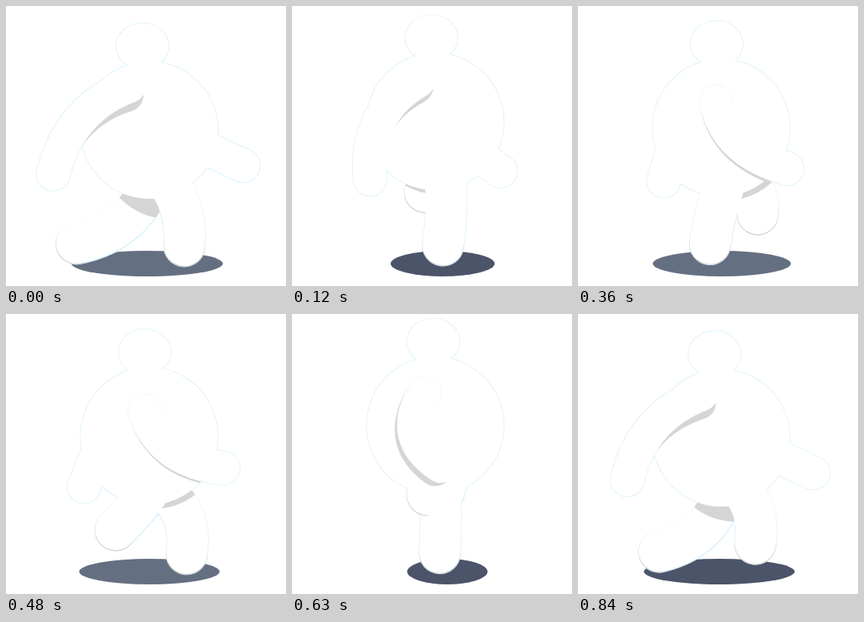
These frames come from a looping animation (350x350 px, 0.87 s). An HTML page with a canvas:

```html
<!DOCTYPE html>
<html lang="en">
<head>
<meta charset="utf-8">
<title>Walk cycle</title>
<style>
  html, body { margin: 0; width: 100%; height: 100%; overflow: hidden; background: #fff; }
  canvas { display: block; width: 350px; height: 350px; }
</style>
</head>
<body>
<canvas id="stage"></canvas>
<script>
const LOOP = 870, STEP = 30, SIZE = 350, TAU = Math.PI * 2;
const WHITE = '#fff', EDGE = '#d3f0fb', RIM = '#d2d2d2', SHADE = '#d5d5d5';
const BODY_X = 179, BODY_R = 86, ARM = 42, LEG = 52;

const cv = document.getElementById('stage');
const ctx = cv.getContext('2d');
const dpr = window.devicePixelRatio || 1;
cv.width = cv.height = Math.round(SIZE * dpr);

const mix = (a, b, k) => a + (b - a) * k;
const wrap = t => (t % LOOP + LOOP) % LOOP;

// Each foot slides back on the ground, then swings forward in an arc.
const nearStep = {
  strike: 0, stance: 455, front: 223, back: 136,
  slide: s => s + 0.13 * Math.sin(TAU * s),
  swing: s => s * s * (3 - 2 * s)
};
const farStep = {
  strike: 470, stance: 400, front: 227, back: 88,
  slide: s => s ** 1.3,
  swing: s => 1 - (1 - s) ** 2.8
};

function foot(step, t) {
  const since = wrap(t - step.strike);
  if (since < step.stance) {
    const s = since / step.stance;
    return [mix(step.front, step.back, step.slide(s)), 300 - 3 * s];
  }
  const s = (since - step.stance) / (LOOP - step.stance);
  const lift = 72 * Math.sin(Math.PI * s ** 0.75);
  return [mix(step.back, step.front, step.swing(s)), 297 + 3 * s - lift];
}

// Curve from hip to foot, with the knee pushed forward by the given amount.
function leg(hipX, hipY, [x, y], knee) {
  const dx = x - hipX, dy = y - hipY, k = knee / Math.hypot(dx, dy);
  return [hipX, hipY, (hipX + x) / 2 + dy * k, (hipY + y) / 2 - dx * k, x, y];
}

function limb(p, width, color, dy = 0) {
  ctx.beginPath();
  ctx.moveTo(p[0], p[1] + dy);
  ctx.quadraticCurveTo(p[2], p[3] + dy, p[4], p[5] + dy);
  ctx.lineWidth = width;
  ctx.strokeStyle = color;
  ctx.stroke();
}

function oval(x, y, rx, ry, color) {
  ctx.beginPath();
  ctx.ellipse(x, y, rx, ry, 0, 0, TAU);
  ctx.fillStyle = color;
  ctx.fill();
}

function inCircle(x, y, r, paint) {
  ctx.save();
  ctx.beginPath();
  ctx.arc(x, y, r, 0, TAU);
  ctx.clip();
  paint();
  ctx.restore();
}

function draw(t) {
  const angle = t / LOOP * TAU;
  const c = Math.cos(angle), s = Math.sin(angle), reach = Math.max(0, c);
  const stride = Math.cos(2 * angle + 0.175);

  const bodyY = 147.3 + 8 * stride;
  const headX = 174 - 2.5 * stride - c;

  const shoulder = [164 - 10 * c, bodyY - 43 - 12 * c];
  const hand = [168 - 109 * c, 203 + 7 * c + 12 * s];
  const elbow = [
    (shoulder[0] + hand[0]) / 2 - 27 - 18 * s * s,
    (shoulder[1] + hand[1]) / 2 - 27 * c - 6 * s
  ];
  const nearArm = [...shoulder, ...elbow, ...hand];

  const farX = 168 + 52 * c, farHandX = 194.5 + 102 * c;
  const farHandY = 208.5 - 9 * c + 5 * s;
  const farArm = [farX, 164, (farX + farHandX) / 2, (164 + farHandY) / 2, farHandX, farHandY];

  const nearLeg = leg(190, 205, foot(nearStep, t), 11 + 11 * c - 15 * s);
  const farLeg = leg(185, 212, foot(farStep, t), 20 + 18 * stride);
  const legs = [farLeg, nearLeg], arms = [farArm, nearArm];

  const torso = (grow, color) => {
    oval(BODY_X, bodyY, BODY_R + grow, BODY_R + grow, color);
    oval(headX, bodyY - 105, 33 + grow, 29 + grow, color);
  };
  const fillLeg = p => {
    oval(p[4], p[5], LEG / 2, LEG / 2, RIM);
    limb(p, LEG - 0.6, WHITE, -0.8);
  };

  ctx.setTransform(dpr, 0, 0, dpr, 0, 0);
  ctx.fillStyle = WHITE;
  ctx.fillRect(0, 0, SIZE, SIZE);
  ctx.lineCap = 'round';

  const pale = t < 540 && stride > 0.3;
  oval(185.3 - 9 * stride, 322, 72.5 + 22.5 * stride, 16, pale ? '#656f82' : '#4b5469');

  legs.forEach(p => limb(p, LEG + 0.8, EDGE));
  arms.forEach(p => limb(p, ARM + 1.4, EDGE));
  torso(0.5, EDGE);

  // The body throws its shadow on the far thigh.
  fillLeg(farLeg);
  const cast = 5 + 20 * reach ** 16;
  inCircle(BODY_X + cast, bodyY + cast, BODY_R, () => limb(farLeg, LEG - 1, SHADE));
  fillLeg(nearLeg);
  limb(farArm, ARM, WHITE);
  torso(-0.2, WHITE);

  // The near arm throws its shadow on the body.
  const drop = 3 + 4 * s * s;
  const shift = [-3 * reach, 11 * reach, -drop / 2 - 1.5 * reach, 0.3 * drop + 5.5 * reach, -drop, 0.6 * drop];
  inCircle(BODY_X, bodyY, BODY_R, () => limb(nearArm.map((v, i) => v + shift[i]), ARM, SHADE));
  limb(nearArm, ARM, WHITE);
}

function tick() {
  draw(Math.floor(performance.now() % LOOP / STEP) * STEP);
  requestAnimationFrame(tick);
}
tick();
</script>
</body>
</html>
```
